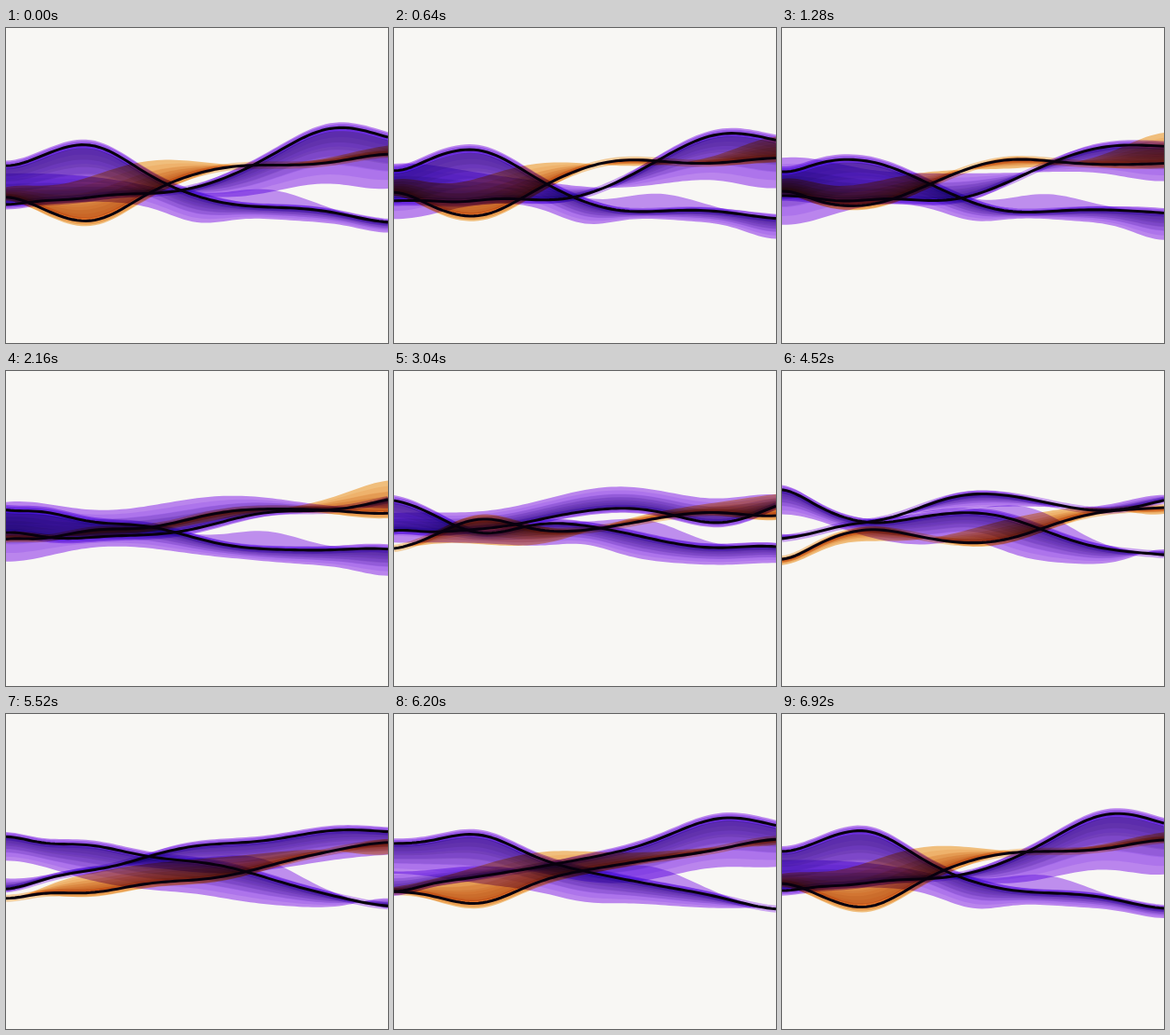
Recreate the animation shown at these times as an HTML page. Size 430 px wide and 355 px high, loop 6.96 s.

```html
<!DOCTYPE html>
<html lang="en">
<head>
<meta charset="utf-8">
<title>Ribbons</title>
<style>
html, body { margin: 0; width: 100%; height: 100%; overflow: hidden; background: #f8f7f4; }
svg { display: block; width: 430px; height: 355px; background: #f8f7f4; }
.tint { mix-blend-mode: multiply; }
</style>
</head>
<body>
<svg id="stage" viewBox="0 0 430 355"></svg>
<script>
const LOOP = 6960, STEP = 40, WIDTH = 430, LAYERS = 6, SHADES = 4;
const VIOLET = { tint: 'rgb(138,40,242)', shade: 'rgb(125,90,155)' };
const AMBER = { tint: 'rgb(240,148,28)', shade: 'rgb(205,150,80)' };
const INK = '#08000e';

const bump = (x, at, width) => Math.exp(-(((x - at) / width) ** 2));

// A sloping S-curve carrying swells that rise and fall once per loop.
const curve = (left, right, bow, swells) => (x, angle) => {
  let y = left + (right - left) * x / WIDTH + bow * Math.sin(2 * Math.PI * x / WIDTH);
  for (const { at, width, size, phase } of swells) {
    y += size * bump(x, at, width) * Math.cos(angle - phase);
  }
  return y;
};
const swell = (at, width, size, phase) => ({ at, width, size, phase });

const falling = curve(148, 209, -4, [
  swell(0, 38, 15, .93), swell(96, 58, 26, 3.06), swell(242, 82, 21, .93), swell(430, 60, 11, -.47)]);
const rising = curve(190, 138, 4, [
  swell(0, 40, 10, -.6), swell(70, 45, 8, .7), swell(200, 88, 26, .92), swell(370, 72, 30, 3.05)]);
const mirrored = (x, angle) => 346 + .035 * x - falling(x, angle);

const ribbons = [
  {
    paint: VIOLET, spine: falling, veil: true,
    edge: curve(191, 220, -4, [swell(0, 80, 31, 1.25), swell(215, 45, 15, .45), swell(430, 45, 19, .98)])
  },
  {
    paint: AMBER, spine: mirrored,
    edge: curve(194, 140, 0, [swell(0, 50, 24, 4.1), swell(160, 90, 24, 3.2), swell(430, 60, 22, 4.37)])
  },
  {
    paint: VIOLET, spine: rising,
    edge: curve(166, 158, 0, [swell(10, 75, 21, 4.6), swell(250, 110, 31, -.35), swell(430, 60, 22, .3)])
  }
];

const stage = document.getElementById('stage');

function addPath(attrs) {
  const path = document.createElementNS('http://www.w3.org/2000/svg', 'path');
  for (const name in attrs) path.setAttribute(name, attrs[name]);
  return stage.appendChild(path);
}

const addFill = (fill, opacity) => addPath({ class: 'tint', fill, 'fill-opacity': opacity });
const addFills = (count, make) => Array.from({ length: count }, (_, i) => make(i));

for (const r of ribbons) {
  const { tint, shade } = r.paint;
  r.layers = addFills(LAYERS, i => addFill(tint, i ? .15 : .55));
  r.shades = addFills(SHADES, () => addFill(shade, .17));
  if (r.veil) r.veilPath = addFill(tint, .5);
  r.glow = addPath({ class: 'tint', fill: 'none', stroke: tint, 'stroke-width': 8, 'stroke-opacity': .4 });
}
for (const r of ribbons) {
  r.ink = addPath({ fill: 'none', stroke: INK, 'stroke-width': 3.1, 'stroke-linejoin': 'round' });
}

const xs = Array.from({ length: 87 }, (_, i) => i * 5);
const points = ys => ys.map((y, i) => xs[i] + ' ' + y.toFixed(2));
const line = ys => 'M' + points(ys).join('L');
const band = (a, b) => line(a) + 'L' + points(b).reverse().join('L') + 'Z';

function draw(t) {
  const angle = 2 * Math.PI * t / LOOP;
  for (const r of ribbons) {
    const spine = xs.map(x => r.spine(x, angle));
    const breadth = xs.map((x, i) => r.edge(x, angle) - spine[i]);
    const across = share => spine.map((y, i) => y + breadth[i] * share);
    // The ribbon overhangs its spine slightly on the side away from its loose edge.
    const rim = spine.map((y, i) => y - 6 * Math.tanh(breadth[i] / 20));

    r.layers.forEach((path, i) => path.setAttribute('d', band(i ? spine : rim, across(1 - i / LAYERS))));
    r.shades.forEach((path, i) => path.setAttribute('d', band(across(.06), across(.65 - .13 * i))));
    if (r.veil) {
      const veil = spine.map((y, i) => y - 20 * bump(xs[i], 290, 62));
      r.veilPath.setAttribute('d', band(spine, veil));
    }
    const path = line(spine);
    r.glow.setAttribute('d', path);
    r.ink.setAttribute('d', path);
  }
}

const start = performance.now();
function tick() {
  const t = (performance.now() - start) % LOOP;
  draw(Math.floor(t / STEP) * STEP);
  requestAnimationFrame(tick);
}
tick();
</script>
</body>
</html>
```
